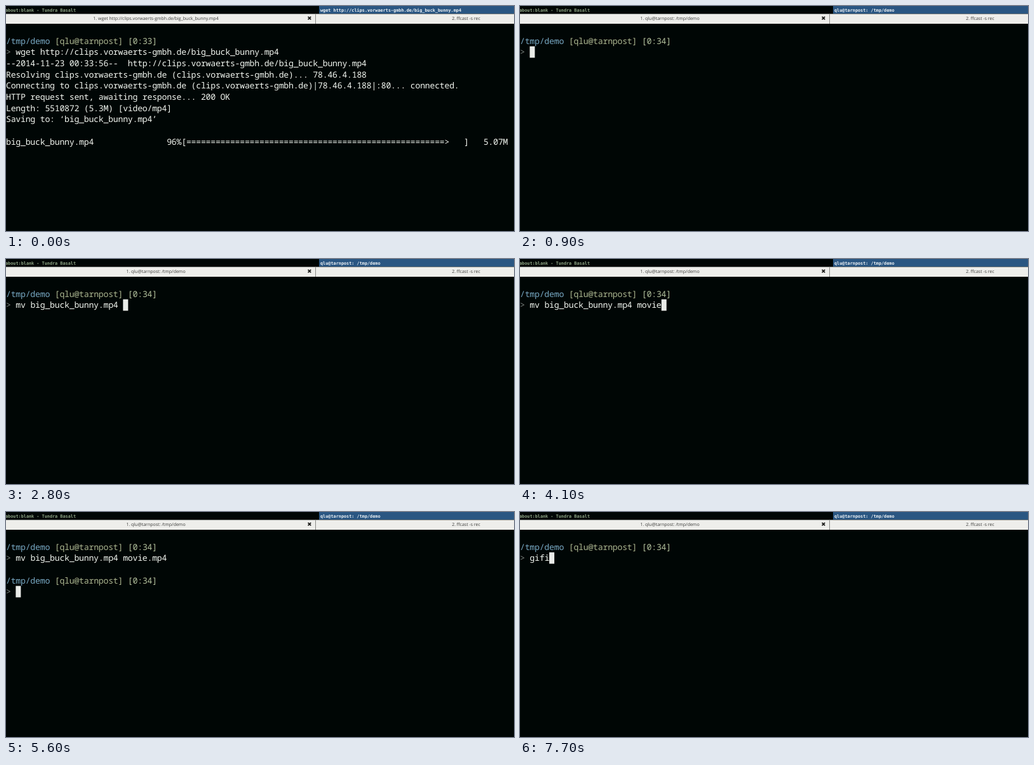
Animation, 800 px wide and 355 px high, one loop 8000 ms. Source, as an HTML page:

```html
<!DOCTYPE html>
<html lang="en">
<head>
<meta charset="utf-8">
<title>Terminal session</title>
<style>
  html, body { margin: 0; width: 100%; height: 100%; overflow: hidden; background: #000605; }
  svg { display: block; width: 800px; height: 355px; }
  text { white-space: pre; text-rendering: geometricPrecision; }
  .term { font: 13.2px "Noto Sans Mono", "DejaVu Sans Mono", monospace; letter-spacing: -0.24px; fill: #f3f7f1; }
  .bar { font: bold 6.84px "DejaVu Sans Mono", monospace; }
  .tab { font: 7px "Open Sans", "Noto Sans", sans-serif; fill: #3c3c3a; text-anchor: middle; }
  .path { fill: #78a9c4; }
  .user { fill: #adb791; }
  .clock { fill: #b4c29e; }
  .mark { fill: #7c8580; }
</style>
</head>
<body>
<svg viewBox="0 0 800 355">
  <rect width="800" height="355" fill="#000605"/>
  <rect x="493" width="307" height="12" fill="#2a5682"/>
  <rect y="12.5" width="800" height="15.5" fill="#eeeeeb"/>
  <rect x="487" y="12.5" width="1" height="15.5" fill="#8b8b88"/>
  <text class="bar" x="-1" y="8.6" fill="#8fa585">about:blank - Tundra Basalt</text>
  <text class="bar" id="title" x="495" y="8.6" fill="#eef3f6"></text>
  <text class="tab" id="tab" x="236" y="22"></text>
  <text class="tab" x="724.5" y="22">2. ffcast -s rec</text>
  <path d="M475.6 16.8l4.6 4.6m0-4.6l-4.6 4.6" stroke="#1c1c1a" stroke-width="1.8"/>
  <rect id="cursor" width="8" height="18" fill="#e9ebe8"/>
  <g id="rows" class="term"></g>
</svg>
<script>
const LOOP = 8000, COL = 7.68, ROW = 17.68, TOP = 63.6 - ROW, BASE = 13.8, BLINK = 600;
const FILE = "big_buck_bunny.mp4";
const HOST = "clips.vorwaerts-gmbh.de";
const URL_TEXT = `http://${HOST}/${FILE}`;
const WHO = "qlu@tarnpost";
const byId = id => document.getElementById(id);

// Each key press: time, and the text on the command line after it.
const typed = (line, start, times) => times.map((t, i) => [t, line.slice(0, start + i + 1)]);
const moveCmd = `mv ${FILE} movie.mp4`;
const movieAt = moveCmd.indexOf("movie");
const keys = [
  [200, ""],
  ...typed("clear", 0, [400, 500, 600, 700, 800]),
  [900, ""],
  ...typed(moveCmd, 0, [1700, 1800, 1900, 2200, 2300, 2400]),
  [2500, moveCmd.slice(0, movieAt)],
  ...typed(moveCmd, movieAt, [3500, 3600, 3800, 3900, 4100, 4500, 4600, 4800, 5000]),
  [5300, ""], [5400, ""], [5700, ""],
  ...typed("gifi", 0, [7400, 7500, 7600, 7700])
];

const span = (cls, text) => `<tspan class="${cls}">${text}</tspan>`;
const prompt = clock => span("path", "/tmp/demo") + " " + span("user", `[${WHO}]`) + " " + span("clock", `[${clock}]`);
const command = text => span("mark", "&gt;") + " " + text;

function progress(percent, filled, size) {
  const bar = ("=".repeat(filled) + ">").padEnd(57);
  return FILE.padEnd(32) + `${percent}%[`.padStart(5) + bar.replace(">", "&gt;") + "]   " + size;
}

function download(t) {
  const done = t >= 100;
  const rows = [
    prompt("0:33"),
    command("wget " + URL_TEXT),
    "--2014-11-23 00:33:56--  " + URL_TEXT,
    `Resolving ${HOST} (${HOST})... 78.46.4.188`,
    `Connecting to ${HOST} (${HOST})|78.46.4.188|:80... connected.`,
    "HTTP request sent, awaiting response... 200 OK",
    "Length: 5510872 (5.3M) [video/mp4]",
    `Saving to: ‘${FILE}’`,
    "",
    done ? progress(100, 56, "5.25M") : progress(96, 53, "5.07M")
  ];
  if (done) rows.push("", `2014-11-23 00:34:02 (891 KB/s) - ‘${FILE}’ saved [5510872/5510872]`);
  return rows;
}

function screen(t) {
  const key = keys.filter(k => k[0] <= t).pop();
  if (!key) return { rows: download(t), cursor: null };
  const [since, line] = key;
  const lit = Math.floor((t - since) / BLINK) % 2 === 0;
  let rows = [];
  if (t < 900) rows = [...download(t), "", ""];
  else if (t >= 5300 && t < 5700) {
    rows = [prompt("0:34"), command(moveCmd)];
    if (t < 5400) return { rows, cursor: [0, 2] };
    rows.push("");
  }
  rows.push(prompt("0:34"), command(line));
  return { rows, cursor: lit ? [line.length + 2, rows.length - 1] : null };
}

const lines = Array.from({ length: 16 }, (_, i) => {
  const el = document.createElementNS("http://www.w3.org/2000/svg", "text");
  el.setAttribute("x", 0);
  el.setAttribute("y", TOP + i * ROW + BASE);
  byId("rows").append(el);
  return { el, text: "" };
});

function draw(t) {
  const { rows, cursor } = screen(t);
  lines.forEach((line, i) => {
    const text = rows[i] || "";
    if (text !== line.text) line.el.innerHTML = line.text = text;
  });
  const box = byId("cursor");
  box.setAttribute("visibility", cursor ? "visible" : "hidden");
  if (cursor) {
    box.setAttribute("x", cursor[0] * COL);
    box.setAttribute("y", TOP + cursor[1] * ROW);
  }
  const title = t < 200 ? "wget " + URL_TEXT : WHO + ": /tmp/demo";
  byId("title").textContent = title;
  byId("tab").textContent = "1. " + title;
}

const start = performance.now();
function frame() {
  draw((performance.now() - start) % LOOP);
  requestAnimationFrame(frame);
}
frame();
</script>
</body>
</html>
```
